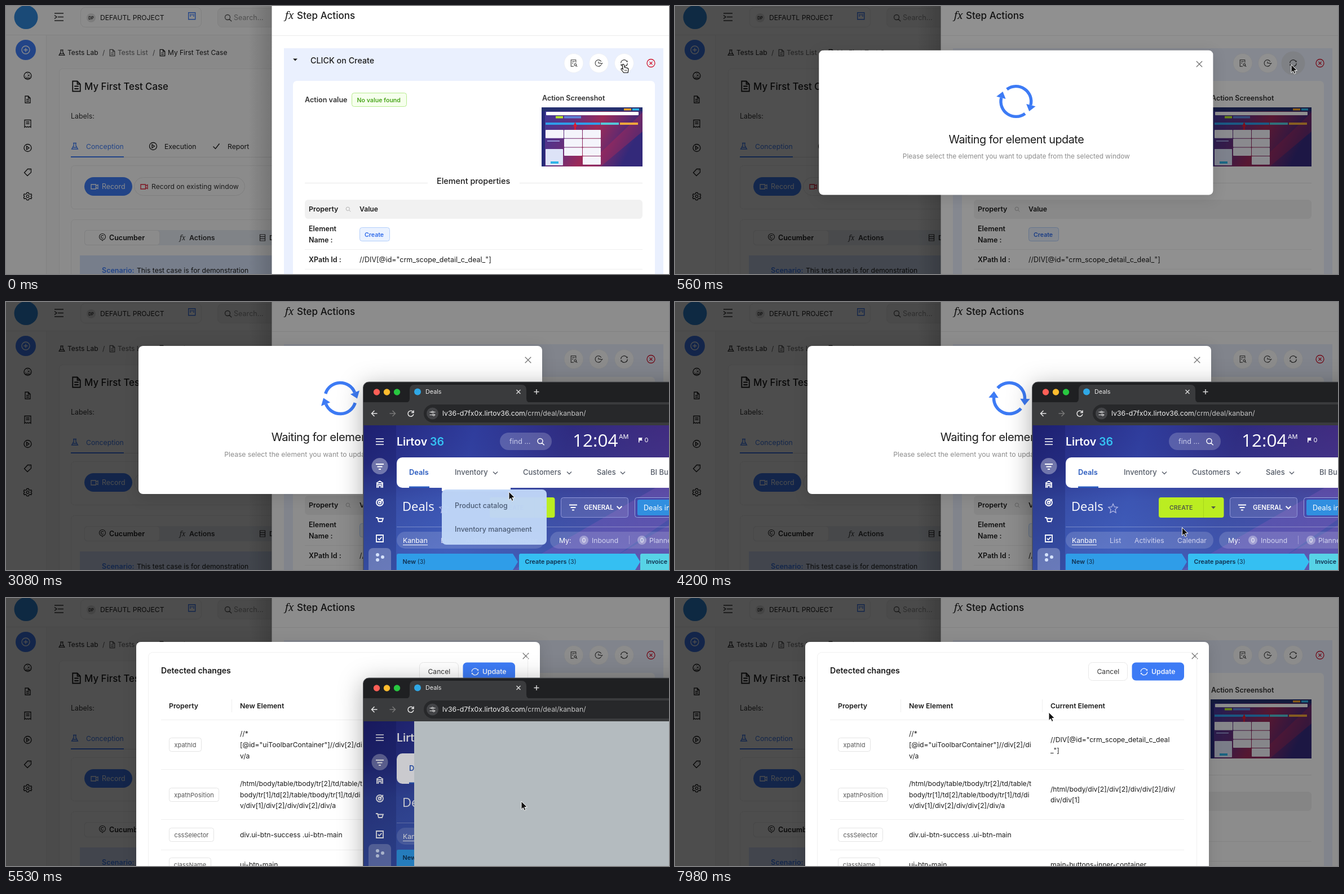
An HTML page for the animation above (8000 ms loop, 1176x476 px).

```html
<!DOCTYPE html>
<html lang="en">
<head>
<meta charset="utf-8">
<title>Element update</title>
<style>
html, body { margin: 0; width: 100%; height: 100%; overflow: hidden; background: #8c8c8c; }
svg { display: block; width: 1176px; height: 476px; font-family: Inter, "Open Sans", sans-serif; }
text { white-space: pre; }
.wide { font-family: "Open Sans", sans-serif; }
#browser { filter: drop-shadow(0 8px 22px rgba(0,0,0,.32)); }
.card { filter: drop-shadow(0 5px 12px rgba(0,0,0,.12)); }
</style>
</head>
<body>
<script>
const BLUE = '#3d7bf5', INK = '#1c1c1c', LOOP = 8000, STEP = 70;

const txt = (x, y, size, str, fill = INK, weight = 400, more = '') =>
  `<text x="${x}" y="${y}" font-size="${size}" fill="${fill}" font-weight="${weight}" ${more}>${str}</text>`;
const box = (x, y, w, h, fill, r = 0, stroke = 'none', more = '') =>
  `<rect x="${x}" y="${y}" width="${w}" height="${h}" fill="${fill}" rx="${r}" stroke="${stroke}" ${more}/>`;
const dot = (x, y, r, fill, stroke = 'none') => `<circle cx="${x}" cy="${y}" r="${r}" fill="${fill}" stroke="${stroke}"/>`;
const line = (d, stroke, w = 1.3) => `<path d="${d}" fill="none" stroke="${stroke}" stroke-width="${w}"/>`;
const fill = (d, color) => `<path d="${d}" fill="${color}"/>`;
const icon = (x, y, d, stroke = INK, scale = 1, w = 1.3) =>
  `<g transform="translate(${x} ${y}) scale(${scale})">${line(d, stroke, w)}</g>`;
const group = (id, body, more = '') => `<g id="${id}" ${more}>${body}</g>`;
const rows = (list, make) => list.map(a => make(...a)).join('');
const MIDDLE = 'text-anchor="middle"', WIDE = 'class="wide"';

const ring = r => `M${-r} 0a${r} ${r} 0 1 1 ${2 * r} 0a${r} ${r} 0 1 1 ${-2 * r} 0`;
const I = {
  flask: 'M-3-5.5h6M-1.8-5.5v4l-3.6 6.5h10.8l-3.6-6.5v-4M-3.6 2h7.2',
  file: 'M-4.5-6h5.5l3.5 3.5v8.5h-9zM1-6v3.5h3.5M-2.5 0h5M-2.5 3h5',
  receipt: 'M-5.5-6.5h11v13l-2-1.5-1.8 1.5-1.7-1.5-1.7 1.5-1.8-1.5-2 1.5zM-3-3h6M-3 0h6',
  play: ring(6.5) + 'M-2-3l4.5 3-4.5 3z',
  gauge: ring(6.5) + 'M0 1l3-3M-4 1h1M3.5 1h1M0-4v1M-4 4h8',
  tag: 'M-6 1l6-6.5 6 0 0 6-6.5 6zM3-3.2h.8',
  gear: ring(2.3) + 'M-1.5-6.5h3l.7 2 2 .9 2-.6 1 2.4-1.6 1.8 1.6 1.8-1 2.6-2-.6-2 .9-.7 2h-3l-.7-2-2-.9-2 .6-1-2.6 1.6-1.8-1.6-1.8 1-2.4 2 .6 2-.9z',
  video: 'M-6-4h8.5v8h-8.5zM2.5-1.5l3.5-2v7l-3.5-2',
  find: 'M-5.5-1a4.5 4.5 0 1 1 9 0a4.5 4.5 0 1 1-9 0M2.2 2.2l4 4',
  close: 'M-5-5l10 10M5-5l-10 10',
  down: 'M-4-2l4 4 4-4',
  plus: 'M-5 0h10M0-5v10',
  filter: 'M-7-4.5h14M-4.5 0h9M-2 4.5h4',
  cart: 'M-7-5h3l2 7h6l2-5.5h-9M-1 5h.1M4 5h.1',
  shop: 'M-6-2l6-4 6 4M-5-1v7M5-1v7M-2.5 6v-4h5v4M-5-1h10',
  target: ring(6) + ring(2.5) + 'M0 0l6-6',
  check: 'M-6-6h12v12h-12zM-3 0l2.3 2.3 4-4.6',
};

// Two arcs with arrow heads, 30 px in radius
const half = 'M-27.5-.6A27.5 27.5 0 0 1 21.7-16.9';
const head = 'M15.2-11.9L28.9-7.8V-22.5z';
const sync = color => [0, 180].map(a =>
  `<g transform="rotate(${a})">${line(half, color, 5.5)}${fill(head, color)}</g>`).join('');
const smallSync = (x, y, color) => `<g transform="translate(${x} ${y}) scale(.21)">${sync(color)}</g>`;
const fx = (x, y, size, color) => txt(x, y, size, 'fx', color, 400, 'font-family="Noto Serif,serif" font-style="italic"');

const app = () =>
  box(0, 0, 1176, 476, '#fdfdfd') + box(72, 52, 400, 424, '#f8f8f9') +
  line('M0 51.5H472M71.5 52V476', '#ececec', 1) +
  dot(35.5, 20, 21, '#2f86d8') +
  line('M86 13h16M92 19.5h10M86 26h16M86 16.5l4 3-4 3', '#333', 1.5) +
  box(132.5, 2.5, 214, 35, 'none', 8, '#e8e8e8') + dot(151, 21, 8, '#e2e2e2') +
  txt(151, 24, 7, 'DP', '#333', 700, MIDDLE) + txt(167, 25, 12.2, 'DEFAUTL PROJECT') +
  line('M323.7 11.7h12v12h-12zM327 14v5M330 14v3M333 14v5', BLUE, 1.4) +
  box(375.5, 3.5, 110, 34, '#f4f4f4', 8, '#e8e8e8') + icon(394, 21, I.find, '#555') + txt(404, 25, 12.6, 'Search...', '#8f8f8f') +
  dot(35, 78, 18, BLUE) + icon(35, 78, ring(7) + 'M-3.5 0h7M0-3.5v7', '#fff') +
  rows([['gauge', 124], ['file', 166], ['receipt', 209], ['play', 252], ['tag', 295], ['gear', 338]], (n, y) => icon(38.5, y, I[n])) +
  icon(99, 83, I.flask, INK, .9) + txt(109, 87, 12, 'Tests Lab') + txt(171, 87, 12, '/', '#555') +
  icon(188.5, 83, I.file, '#555', .95) + txt(198, 87, 12, 'Tests List', '#666') + txt(260, 87, 12, '/', '#555') +
  icon(277.5, 83, I.file, INK, .95) + txt(287, 87, 12, 'My First Test Case') +
  box(94.5, 111.5, 500, 500, '#fcfcfc', 6, '#ececec') +
  icon(125, 142.5, I.file, INK, 1.5, 1.2) + txt(139, 149, 16.8, 'My First Test Case', INK, 500) +
  txt(115, 200, 12.4, 'Labels:', '#333') +
  line('M115 268.5H472', '#e4e4e4', 1) + box(115, 267, 94, 2, BLUE) +
  icon(122, 249, I.flask, BLUE) + txt(142, 254, 12.25, 'Conception', BLUE) +
  icon(261, 249, I.play) + txt(281, 254, 12.2, 'Execution') +
  line('M367.5 249.5l4 4 7-9', INK, 1.4) + txt(393, 254, 12.2, 'Report') +
  box(115.5, 283.5, 500, 77, 'none', 6, '#ececec') +
  box(139, 304, 85, 33, BLUE, 16.5) + icon(157, 321, I.video, '#fff') + txt(170, 325, 12.4, 'Record', '#fff') +
  box(227.5, 304.5, 196, 32, 'none', 16, '#e6e6e6') + icon(245, 321, I.video, '#e3203a') + txt(258, 325, 12.2, 'Record on existing window', '#333') +
  box(115.5, 379.5, 500, 300, 'none', 6, '#ececec') +
  box(139, 398, 400, 27, '#e8edf6', 5) + box(139.5, 398.5, 133, 26, '#fdfdfd', 5, '#e8e8e8') +
  icon(171, 410, ring(5.5) + 'M2-1.5a2.5 2.5 0 1 0 0 3M0 5.5v2', INK, 1, 1.1) + txt(183, 416, 12.5, 'Cucumber', INK, 600) +
  fx(308, 416, 12, '#333') + txt(325, 416, 12.4, 'Actions', '#333', 600) +
  line('M450.5 406h9v11h-9zM450.5 409.7h9M450.5 413.4h9', '#333', 1.2) + txt(467, 416, 12.4, 'Data', '#333', 600) +
  box(131, 443, 400, 40, '#d8e5fc') +
  txt(170, 474, 12.5, 'Scenario:', BLUE, 600) + txt(232, 474, 12.15, 'This test case is for demonstration');

const thumb = () =>
  box(950, 180, 179, 105, 'url(#thumb)') + fill('M1055 285l74-62v-34l-100 96z', 'rgba(190,40,80,.35)') +
  box(950, 180, 179, 7, '#25306f') + box(950, 187, 6, 98, '#252a78') + box(958, 188, 164, 6, '#fff', 1) +
  box(1096, 182, 13, 3.5, '#f4a02a') + box(1111, 182, 12, 3.5, '#2fb4e8') + box(975, 195.5, 13, 4, '#b7ea29') +
  box(990, 195.5, 30, 4, '#5f86d8') + box(957, 207, 97, 4, '#2f9de8') + box(1055, 207, 32, 4, '#55c6d8') + box(1089, 207, 32, 4, '#efa63c') +
  rows([[957, 1], [990, 3], [1023, 4]], (x, n) => Array.from({ length: n }, (_, i) => box(x, 220 + i * 15.7, 32, 14.7, '#f4f4fb', 1)).join('')) +
  box(957, 254, 31, 29, '#dde3f7', 1) + box(966, 276, 14, 4, '#2fb4e8') + box(960, 239, 22, 1.5, '#aab6f0') +
  fill('M1009.5 206l3.5 8h-2.2v6h-2.6v-6h-2.2z', '#e01b2e');

const drawer = () =>
  box(430, 0, 42, 476, 'url(#side)') + box(471.5, 0, 705, 476, '#fff') +
  fx(495, 23, 18, INK) + txt(516, 23, 17, 'Step Actions', INK, 500) + line('M472 52.5H1176', '#ececec', 1) +
  box(493, 75, 673, 420, '#eaf0fe') + fill('M509 93.5h8l-4 4z', INK) + txt(540, 102, 14.3, 'CLICK on Create', INK, 500) +
  [1007, 1051.5, 1096.5].map(x => dot(x, 101.5, 17, '#fff', '#eceff6')).join('') +
  group('press', dot(1096.5, 101.5, 21, '#e0e3ea')) +
  icon(1007, 101.5, 'M4-1v-5h-9v12h5M-3-3h5M-3 0h2M1 3a2 2 0 1 1 4 0a2 2 0 1 1-4 0M4.5 4.5l2 2', '#333', .95, 1.1) +
  icon(1051, 101.5, 'M5 3a6 6 0 1 1 0-6M0-3v3h5M4 0l2 1.5 1.5-2', '#333', .95, 1.1) + smallSync(1096.5, 101.5, '#333') +
  icon(1144, 101.5, ring(7) + 'M-2.6-2.6l5.2 5.2M2.6-2.6l-5.2 5.2', '#d0182f') +
  box(509, 133, 642, 400, '#fff', 7) + txt(530, 171, 12.6, 'Action value', '#333', 600) +
  box(613.5, 154.5, 97, 24, '#f6ffed', 4, '#b7eb8f') + txt(622.5, 170.5, 10.6, 'No value found', '#4aa51c', 600) +
  txt(951, 168, 12.5, 'Action Screenshot', '#333', 600) + thumb() +
  line('M530 314.5H748M911 314.5H1129', '#e8e8e8', 1) + txt(764, 316, 14.4, 'Element properties', INK, 500) +
  box(530, 344, 599, 34, '#f1f1f1', 6) + txt(537, 365, 12.4, 'Property', INK, 600) + icon(607, 361, I.find, '#aaa', .7) + txt(627, 365, 12.2, 'Value', INK, 600) +
  txt(537, 400, 12.5, 'Element', INK, 600) + txt(537, 420, 12.5, 'Name :', INK, 600) +
  box(627.5, 393.5, 53, 24, '#eaf2ff', 4, '#b4cffb') + txt(636, 409.5, 10.6, 'Create', '#2f6bea', 600) +
  line('M530 432.5H1129M530 467.5H1129', '#efefef', 1) + txt(537, 455, 12.5, 'XPath Id :', INK, 600) +
  txt(627, 455, 12.5, '//DIV[@id="crm_scope_detail_c_deal_"]');

const waiting = () =>
  box(235, 78, 716, 263, '#fff', 8, 'none', 'class="card"') + icon(926, 103, I.close, '#777', 1.05, 1.3) +
  group('spin', sync(BLUE)) +
  txt(593.5, 247, 20.2, 'Waiting for element update', INK, 400, MIDDLE + ' letter-spacing="-.022em"') +
  txt(593.5, 275, 12.15, 'Please select the element you want to update from the selected window', '#8c8c8c', 400, MIDDLE);

const changes = () =>
  box(231, 78, 716, 500, '#fff', 8, 'none', 'class="card"') + icon(922, 103, I.close, '#777', 1.05, 1.3) +
  box(252.5, 96.5, 673, 500, 'none', 8, '#f0f0f0') + txt(275, 134, 14.1, 'Detected changes', INK, 600) +
  box(733.5, 114.5, 69, 32, '#fff', 7, '#e8e8e8') + txt(748.5, 135, 12.1, 'Cancel', '#333') +
  box(810.5, 114.5, 92.5, 32, BLUE, 7) + smallSync(832, 131, '#fff') + txt(845, 135, 12.3, 'Update', '#fff', 500) +
  rows([[289, 'Property'], [415, 'New Element'], [666, 'Current Element']], (x, s) => txt(x, 196, 12.35, s, INK, 600)) +
  line('M400.5 180v23M651.5 180v23M275 216.5H903M275 304.5H903M275 393.5H903M275 447.5H903', '#efefef', 1) +
  rows([['xpathId', 248, 57], ['xpathPosition', 337, 88], ['cssSelector', 408, 79], ['className', 461, 74]], (s, y, w) =>
    box(289.5, y + .5, w, 24, '#fff', 4, '#e4e4e4') + txt(289.5 + w / 2, y + 16.5, 11, s, '#555', 400, MIDDLE)) +
  rows([
    [415, 245, '//*'], [415, 265, '[@id="uiToolbarContainer"]//div[2]/di'], [415, 285, 'v/a'],
    [415, 334, '/html/body/table/tbody/tr[2]/td/table/t'], [415, 354, 'body/tr[1]/td[2]/table/tbody/tr[1]/td/di'],
    [415, 373, 'v/div[1]/div[2]/div/div[2]/div/a'], [415, 425, 'div.ui-btn-success .ui-btn-main'], [415, 478, 'ui-btn-main'],
    [666, 256, '//DIV[@id="crm_scope_detail_c_deal'], [666, 275, '_"]'], [666, 344, '/html/body/div[2]/div[2]/div/div[2]/div/'],
    [666, 363, 'div/div[1]'], [666, 478, 'main-buttons-inner-container']], (x, y, s) => txt(x, y, 12.15, s));

const chrome = () =>
  box(633.5, 142, 700, 500, '#1f2022', 10, '#55565a') +
  rows([[657.5, '#fe5f57'], [675.5, '#febc2e'], [693.5, '#28c840']], (x, c) => dot(x, 160, 5.7, c)) +
  fill('M708 179q8 0 8-8v-15q0-9 9-9h189q9 0 9 9v15q0 8 8 8z', '#3a3b3d') + box(634, 178, 600, 41, '#3a3b3d') +
  dot(730, 159.5, 6, '#2fa8e6') + txt(744, 163, 10.8, '', '#e8e8e8', 400, 'id="tab"') +
  icon(909, 159.5, I.close, '#ddd', .7, 2) + icon(941, 159.5, I.plus, '#ddd', .9, 1.6) +
  icon(653.5, 198, 'M5 0h-10M0-5l-5 5 5 5', '#e6e6e6', 1, 1.5) + icon(685.5, 198, 'M-5 0h10M0-5l5 5-5 5', '#777', 1, 1.5) +
  icon(718, 198, 'M4.5-2a5 5 0 1 0 .4 3.2M5-5.5v4h-4', '#e6e6e6', 1, 1.5) +
  box(741, 182, 600, 32, '#27282a', 16) + dot(756.5, 198, 10.5, '#434447') +
  icon(756.5, 198, 'M-5-2.5h3M2-2.5h3M-5 2.5h5M4 2.5h1M-1.5-2.5a1.5 1.5 0 1 0 3 0a1.5 1.5 0 1 0-3 0M.5 2.5a1.5 1.5 0 1 0 3 0a1.5 1.5 0 1 0-3 0', '#e6e6e6', 1, 1.2) +
  `<text x="774" y="202" font-size="12.3" fill="#f0f0f0">lv36-d7fx0x.lirtov36.com<tspan id="path" fill="#c4c4c4"></tspan></text>`;

const crm = () =>
  box(634, 219, 560, 270, 'url(#sky)') + box(634, 219, 560, 270, 'url(#haze)') +
  fill('M900 476l276-160v70l-130 90z', 'rgba(140,90,190,.3)') + fill('M1040 476l136-80v80z', 'rgba(150,90,180,.25)') +
  line('M634 219V476', '#55565a', 1) +
  box(634, 219, 58, 270, 'rgba(10,10,70,.18)') + line('M656 243h14M656 248h14M656 253h14', '#fff', 1.5) +
  dot(663, 291.5, 14.5, 'rgba(255,255,255,.35)') + icon(663, 292.5, I.filter, '#fff', 1, 2.2) +
  rows([['shop', 324], ['target', 356], ['cart', 388], ['check', 420]], (n, y) => icon(663, y, I[n], '#fff', 1, 1.8)) +
  box(643, 437, 40, 50, 'rgba(255,255,255,.25)', 8) +
  rows([[659, 449, 3], [668, 453, 3], [659, 458, 3]], (x, y, r) => dot(x, y, r, '#d5e2fa')) +
  txt(693, 255, 19.6, 'Lirtov <tspan fill="#35c4f5">36</tspan>', '#fff', 600) +
  box(876, 232, 92, 31, 'rgba(255,255,255,.2)', 15.5) + txt(893, 252, 12.6, 'find ...', '#c9cdea') + icon(948.5, 248, I.find, '#fff', 1, 1.5) +
  txt(1005, 257, 31.5, '12:04', '#fff', 400, WIDE) + txt(1087, 243, 11, 'AM', '#fff') +
  fill('M1122 241h7l-1.5 2.5 1.5 2.5h-5.5v3.5h-1.5z', '#fff') + txt(1132.5, 249, 11, '0', '#fff') +
  box(693, 276, 600, 54, '#fff', 10) + txt(715, 307, 12.8, 'Deals', '#2a5bbf', 600) + box(715, 327.5, 36, 2.5, '#2a5bbf') +
  rows([[796, 'Inventory', 868], [917, 'Customers', 999], [1048, 'Sales', 1094]], (x, s, c) =>
    txt(x, 307, 13, s, '#555c68', 500) + icon(c, 303.5, I.down, '#555c68')) + txt(1143, 307, 13, 'BI Builder', '#555c68', 500) +
  txt(703, 371, 22, 'Deals', '#fff', 400, WIDE) +
  icon(777, 366.5, 'M0-8l2.4 5.4 5.8.6-4.3 3.9 1.2 5.8-5.1-3-5.1 3 1.2-5.8-4.3-3.9 5.8-.6z', '#b9bde8', 1, 1.2) +
  box(858, 347, 115.5, 36, '#bbed21', 4) + box(937, 347, 1, 36, '#a8d61c') +
  group('pick', box(858, 347, 79, 36, 'rgba(230,255,130,.3)', 4) + box(877, 347, 43, 34, '#a9b69a')) +
  txt(877, 369, 10.6, 'CREATE', '#535c45', 600) + fill('M951 363h8l-4 4.5z', '#535c45') +
  box(984.5, 347.5, 119, 35, 'rgba(255,255,255,.1)', 4, '#8f95d8') + icon(1006, 365, I.filter, '#fff', 1, 2) +
  txt(1025, 369, 11.3, 'GENERAL', '#fff', 600) + icon(1088, 365, I.down, '#fff', 1.1, 1.8) +
  box(1115.5, 347.5, 200, 35, 'rgba(40,60,170,.4)', 4, '#9aa2dc') + box(1120, 351, 100, 28, '#318fe0', 3) + txt(1131, 369.5, 12.6, 'Deals in', '#fff') +
  line('M693 399.5H1176', 'rgba(255,255,255,.3)', 1) + box(693, 408, 262, 30, 'rgba(255,255,255,.15)', 15) + box(965, 408, 300, 30, 'rgba(255,255,255,.15)', 15) +
  rows([[704, 'Kanban', '#fff'], [771, 'List'], [815, 'Activities'], [891, 'Calendar'], [981, 'My:', '#fff'], [1039, 'Inbound'], [1141, 'Planned']],
    (x, s, c = '#d2d5f0') => txt(x, 427.5, 12.2, s, c)) + box(704, 431, 44, 1, '#fff') + box(1105, 415, 1, 15, 'rgba(255,255,255,.3)') +
  [1025, 1128].map(x => dot(x, 423, 8, 'rgba(255,255,255,.35)') + txt(x, 427, 10.5, '0', '#fff', 400, MIDDLE)).join('') +
  rows([[693, 'New', 3, '#2f9de8'], [910, 'Create papers', 3, '#35bff2'], [1125, 'Invoice', 2, '#57d3e6']], (x, s, n, c) =>
    fill(`M${x} 450q0-3 3-3h203l9 14.5-9 14.5h-206z`, c) + txt(x + 10.5, 465, 10.8, `${s} <tspan font-weight="400">(${n})</tspan>`, '#10304f', 600)) +
  group('menu', box(773, 296, 122, 40, '#fff') + txt(796, 307, 13, 'Inventory', '#555c68', 500) + icon(868, 303.5, I.down, '#555c68') +
    box(773, 333, 186, 98, '#bfd6f7', 8, 'none', 'opacity=".97"') +
    txt(796, 365.5, 12.4, 'Product catalog', '#4b5b74', 500) + txt(796, 408, 12.4, 'Inventory management', '#4b5b74', 500));

const deal = () =>
  box(692, 219, 600, 300, '#b4bbbf') +
  group('form', fill('M692 234h-20.5a17.5 17.5 0 0 0 0 35h20.5z', '#8f7dd8') + icon(672, 251.5, I.close, '#fff', .85, 1.8) +
    fill('M692 286h-20.5a17.2 17.2 0 0 0 0 34.4h20.5z', '#d3d6da') + icon(672.5, 303, 'M-4-5l8 8M4-3v6h-6M-6 7h12', '#7b838c', 1, 1.6) +
    txt(722, 256, 22, 'New deal', '#2d3136', 400, WIDE) +
    icon(828, 250, 'M-1 2l-1.5 1.5a2 2 0 0 1-3-3l2.5-2.5M1-2l1.5-1.5a2 2 0 0 1 3 3l-2.5 2.5M-2 2l4-4', '#7c8387', .8, 1.4) +
    rows([[712, 'New'], [849, 'Create papers'], [985, 'Invoice'], [1121, 'In progress']], (x, s) =>
      fill(`M${x} 283q0-3 3-3h122l9.5 14.3-9.5 14.3h-122q-3 0-3-3z`, '#9fa5a9') + txt(x + 7.5, 299, 10.7, s, '#34383c', 600)) +
    rows([[727, 'General', '#1f62d0'], [806, 'Products', '#1f62d0'], [893, 'Estimates'], [985, 'Invoices'], [1067, 'Automation'], [1169, 'History']],
      (x, s, c = '#7f868b') => txt(x, 345, 12.4, s, c, 600)) + box(727, 354, 47, 2, '#1f62d0') +
    box(711, 377, 340, 150, '#fff', 9) + txt(724, 401, 10.3, 'ABOUT DEAL', '#4d555e', 600) + icon(800, 397, 'M-4 4l1-3 5-5 2 2-5 5z', '#9aa0a6', 1, 1.1) +
    txt(1001.5, 401, 12, 'cancel', '#a0a5aa') + line('M724 417.5H1038', '#e8eaec', 1) + txt(724, 442, 10.8, 'Name', '#90969c') +
    box(724.5, 448.5, 298, 40, '#fff', 2, '#7f8cb0') + txt(735, 471, 12, 'Deal #', '#b9bec4') + icon(1036, 466, I.gear, '#b0b5ba', .75, 1.5) +
    dot(1082.5, 396.5, 14.5, '#2f9fe0') + fill('M1076.5 391h12v9h-8l-3 3v-3h-1z', '#fff') +
    box(1107, 377, 200, 150, '#fff', 9) + txt(1130, 402.5, 12.2, 'Activity', '#1f62d0') + box(1130, 417, 43, 1.5, '#5b6570') +
    box(1118.5, 430.5, 200, 80, '#fff', 6, '#d4d8dc') + txt(1133, 453, 12.6, 'Write that', '#a9aeb4'));

const gradient = (id, dir, stops) => `<linearGradient id="${id}" ${dir}>` +
  stops.map(([o, c]) => `<stop offset="${o}" stop-color="${c}"/>`).join('') + '</linearGradient>';

document.body.innerHTML = `<svg viewBox="0 0 1176 476"><defs>` +
  gradient('thumb', 'x2="1" y2=".3"', [[0, '#3a3a9c'], [.35, '#63307f'], [.6, '#9c2a58'], [.8, '#6a2a6c'], [1, '#33297a']]) +
  gradient('side', '', [[0, 'rgba(0,0,0,0)'], [1, 'rgba(0,0,0,.16)']]) +
  gradient('sky', 'x2="1" y2=".1"', [[0, '#23257a'], [.35, '#2f3c9c'], [.65, '#2f2b80'], [1, '#432c80']]) +
  gradient('haze', 'x2="0" y2="1"', [[0, 'rgba(80,125,215,0)'], [.25, 'rgba(80,125,215,.08)'], [.5, 'rgba(80,125,215,.4)'], [1, 'rgba(80,125,215,.6)']]) + '</defs>' +
  app() + box(0, 0, 1176, 476, 'rgba(0,0,0,.45)') + drawer() +
  box(0, 0, 1176, 476, '#000', 0, 'none', 'id="mask"') +
  group('waiting', waiting()) + group('changes', changes()) +
  group('browser', chrome() + crm() + group('veil', box(634, 219, 560, 270, 'rgba(0,0,20,.35)')) + group('deal', deal())) +
  group('arrow', '<path d="M0 0v14.5l3.3-3 2.2 5 2.5-1.1-2.2-4.9h4.6z" fill="#111" stroke="#fff"/>') +
  group('hand', '<path d="M-1.5 0c1.5-1.2 2.7-.3 2.9 1l.7 4 5 1.2c1.6.4 2 1.5 1.8 3l-.8 5.3h-7.4l-4.4-5.5c-1-1.4.8-2.8 2-1.6l1 1-1.3-7.2z" fill="#fff" stroke="#111" stroke-width="1.2"/>' +
    line('M3 9v3M5.3 9v3', '#111', .8)) + '</svg>';

const $ = id => document.getElementById(id);
const clamp = u => Math.max(0, Math.min(1, u));
const ramp = (t, start, time) => clamp((t - start) / time);
const move = (id, x, y, more = '') => $(id).setAttribute('transform', `translate(${x} ${y}) ${more}`);
const alpha = (id, a) => {
  $(id).setAttribute('opacity', a);
  $(id).setAttribute('display', a > 0 ? 'inline' : 'none');
};

// time, x, y of the pointer
const route = [[0, 1093, 104], [700, 1093, 104], [980, 1077, 114], [1820, 971, 133], [2170, 971, 133], [2660, 958, 165],
  [2870, 866, 303], [3080, 892, 337], [3500, 935, 415], [3990, 885, 440], [4410, 914, 361], [5740, 914, 361],
  [6160, 840, 332], [6440, 775, 308], [6510, 775, 308], [6580, 684, 240], [6650, 580, 159], [7000, 580, 159],
  [7210, 552, 137], [7630, 552, 137], [7980, 663, 203], [8000, 663, 203]];

function pointer(t) {
  const i = route.findIndex(p => p[0] > t), [t0, x0, y0] = route[i - 1], [t1, x1, y1] = route[i];
  const u = (t - t0) / (t1 - t0), s = u * u * (3 - 2 * u);
  return [x0 + (x1 - x0) * s, y0 + (y1 - y0) * s];
}

function draw(now) {
  const t = Math.floor(now % LOOP / STEP) * STEP;
  const open = ramp(t, 420, 315), ease = 1 - (1 - open) ** 6;
  alpha('press', t >= 70 && t < 980 ? 1 : 0);
  alpha('mask', .45 * ease);
  alpha('waiting', t < 5250 ? clamp(open * 3) : 0);
  move('waiting', 1096, 108, `scale(${.2 + .8 * ease}) translate(-1096 -108)`);
  move('spin', 593, 171, `rotate(${16 + 360 * (t - 2030) / 1050})`);
  alpha('changes', t >= 5250 ? 1 : 0);

  alpha('browser', t < 6930 ? ramp(t, 2310, 140) : 0);
  alpha('menu', Math.min(ramp(t, 2800, 140), 1 - ramp(t, 3080, 210)));
  alpha('pick', t >= 4410 && t < 5250 ? 1 : 0);
  const slide = ramp(t, 5320, 350);
  alpha('veil', slide);
  alpha('deal', slide > 0 ? 1 : 0);
  move('deal', 500 * (1 - slide) ** 3, 0);
  alpha('form', ramp(t, 5810, 140));
  $('tab').textContent = t < 5810 ? 'Deals' : 'New deal';
  $('path').textContent = t < 5810 ? '/crm/deal/kanban/' : '/crm/deal/details/0/?st%5Btool%5D=crm&st%5Bc';

  const [x, y] = pointer(t), hand = t < 350 || t >= 4410 && t < 5460;
  move('arrow', x, y);
  move('hand', x + 2, y);
  alpha('arrow', hand ? 0 : 1);
  alpha('hand', hand ? 1 : 0);
}

const start = performance.now();
function tick() {
  draw(performance.now() - start);
  requestAnimationFrame(tick);
}
tick();
</script>
</body>
</html>
```
